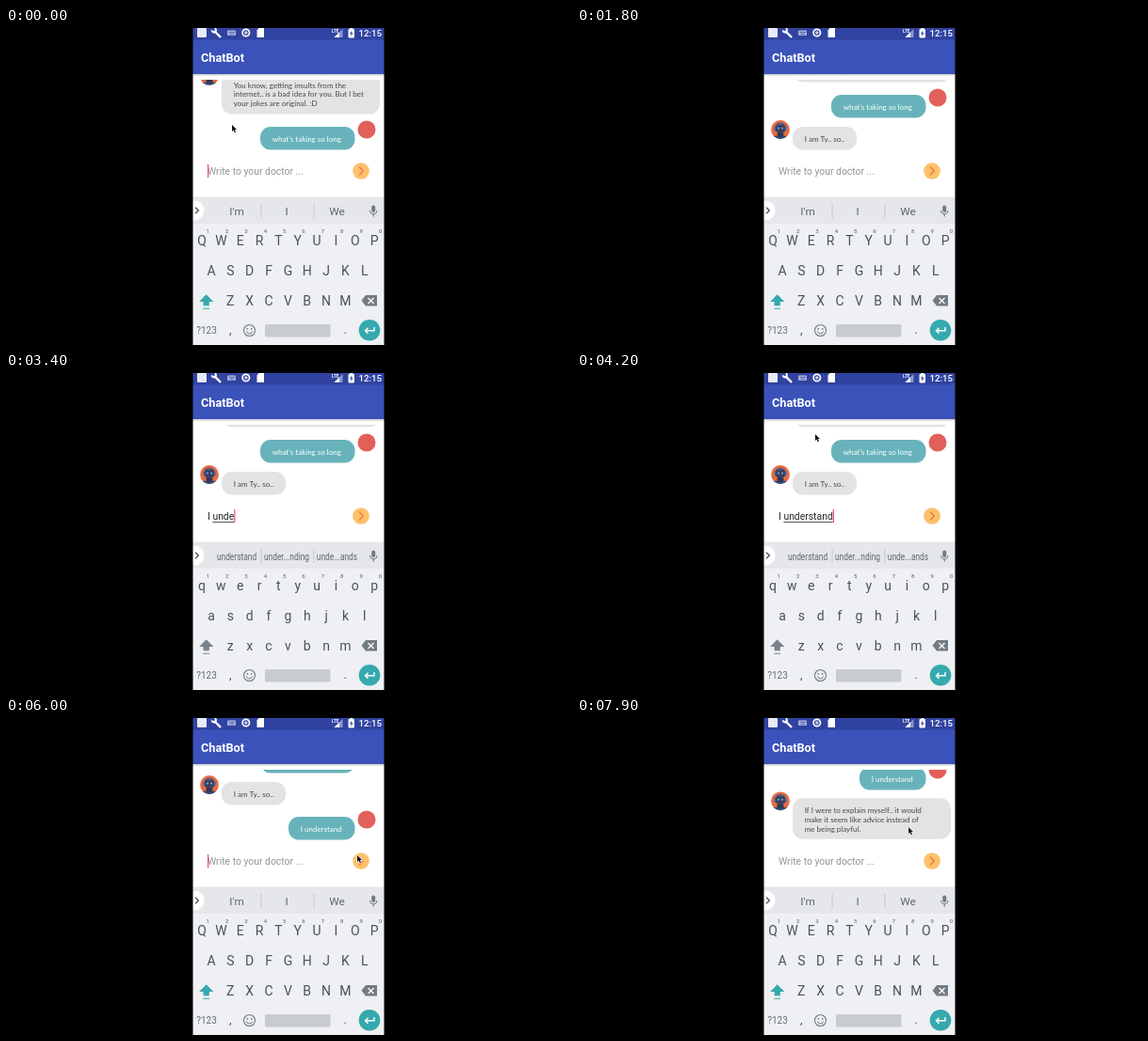
An HTML page with a canvas that plays this animation: 600 px wide and 337 px high, repeating every 8 s.

```html
<!DOCTYPE html>
<html lang="en">
<head>
<meta charset="utf-8">
<title>ChatBot</title>
<style>
html, body { margin: 0; width: 100%; height: 100%; overflow: hidden; background: #000; }
canvas { display: block; }
</style>
</head>
<body>
<canvas width="600" height="337"></canvas>
<script>
const c = document.querySelector('canvas').getContext('2d');
const LOOP = 8000, SEND = 4800, SHIFT_OFF = 2300, SHIFT_ON = 5400;
const UI = 'Roboto, sans-serif', CHAT = 'Lato, sans-serif';
const TEAL = '#35a9ae', GREY = '#737c83', KEY = '#4a535a';
const TYPED = 'I understand';

// Chat history in list coordinates; `me` marks the right-hand side.
const messages = [
  { y: 47.9, w: 168, lines: ['You know, getting insults from the', 'internet.. is a bad idea for you. But I bet', 'your jokes are original. :D'] },
  { y: 105, w: 100.5, me: true, lines: ["what's taking so long"] },
  { y: 139, w: 68, at: 900, lines: ['I am Ty.. so..'] },
  { y: 176, w: 70.5, at: SEND, me: true, lines: [TYPED] },
  { y: 209.3, w: 168, at: 7500, lines: ['If I were to explain myself.. it would', 'make it seem like advice instead of', 'me being playful.'] }
];
const scrolls = [[900, 34], [SEND, 37], [7500, 53]];
const pointerPath = [[0, 240, 103], [3950, 253, 65], [4250, 253, 65], [4700, 373, 146], [6700, 373, 146], [7100, 368, 140], [7900, 352, 116], [8000, 352, 116]];

const clamp = v => Math.max(0, Math.min(1, v));
const ease = v => 1 - (1 - clamp(v)) ** 3;

function rect(x, y, w, h, color, r = 0) {
  c.fillStyle = color;
  c.beginPath();
  c.roundRect(x, y, w, h, r);
  c.fill();
}
function circle(x, y, r, color, from = 0, to = 7) {
  c.fillStyle = color;
  c.beginPath();
  c.arc(x, y, r, from, to);
  c.fill();
}
function poly(points, color) {
  c.fillStyle = color;
  c.beginPath();
  points.forEach(p => c.lineTo(...p));
  c.closePath();
  c.fill();
}
function line(points, color, width = 1) {
  c.strokeStyle = color;
  c.lineWidth = width;
  c.beginPath();
  points.forEach(p => c.lineTo(...p));
  c.stroke();
}
function ring(x, y, r, color, width = 1, from = 0, to = 7) {
  c.strokeStyle = color;
  c.lineWidth = width;
  c.beginPath();
  c.arc(x, y, r, from, to);
  c.stroke();
}
function text(s, x, y, size, color, { family = UI, weight = 400, align = 'left' } = {}) {
  c.font = `${weight} ${size}px ${family}`;
  c.fillStyle = color;
  c.textAlign = align;
  c.fillText(s, x, y);
}
const centered = (s, x, y, size, color, weight) => text(s, x, y, size, color, { align: 'center', weight });

function header() {
  rect(198, 0, 204, 49, '#3a52b9');
  rect(198, 0, 204, 12.5, '#3143a0');
  text('ChatBot', 207, 35.5, 12.7, '#fff', { weight: 700 });
  rect(203, 0, 10, 10, '#e8eaf6', 1);
  line([[221, 3], [228, 10]], '#fff', 2.4);
  ring(220.8, 2.3, 2.2, '#fff', 1.8, -1.2, 3.1);
  rect(235, 2.5, 9, 5.5, '#aab3dd', 1);
  line([[236.5, 4.5], [243, 4.5]], '#3143a0', .7);
  line([[237.5, 6.6], [242, 6.6]], '#3143a0', .7);
  ring(254.8, 5, 3.7, '#fff', 1.7);
  circle(254.8, 5, 1.8, '#c5cae9');
  poly([[268.5, 0], [274, 0], [274, 10], [266.5, 10], [266.5, 2.5]], '#fff');
  text('LTE', 346, 4.5, 4.5, '#fff', { weight: 700 });
  poly([[357.5, 1], [357.5, 10], [348.5, 10]], '#8d98d0');
  poly([[354, 4.5], [354, 10], [348.5, 10]], '#fff');
  rect(363.5, 1, 6.5, 9.5, '#fff', 1);
  rect(365.3, 0, 3, 2, '#fff');
  poly([[367.3, 2.5], [365, 6.2], [366.6, 6.2], [366.2, 9], [368.6, 5.2], [367, 5.2]], '#3143a0');
  text('12:15', 374.5, 9, 9.7, '#fff', { weight: 500 });
  const shade = c.createLinearGradient(0, 49, 0, 52);
  shade.addColorStop(0, '#0003');
  shade.addColorStop(1, '#0000');
  rect(198, 49, 204, 3, shade);
}

function robot(y) {
  circle(216, y, 9.9, '#ea6a40');
  circle(216, y, 9.9, '#2f4c80', .75, Math.PI - .75);
  ring(216, y - 1, 5.8, '#3f5c92', 1.4, Math.PI, 0);
  rect(209.5, y - 3, 13, 5, '#3f66a0', 2);
  rect(211.3, y - 5.5, 9.4, 9, '#3a4160', 3);
  rect(212.5, y + 3, 7, 5, '#2f3758', 2);
  circle(214, y - 1.5, 1, '#8ea9cf');
  circle(218, y - 1.5, 1, '#8ea9cf');
}

function bubble(m, offset) {
  const h = m.lines.length > 1 ? 43.5 : 24.5;
  const y = m.y - offset, x = m.me ? 370.5 - m.w : 229;
  if (m.me) circle(383, y + 3, 9.5, '#e2605a');
  else robot(y + 3);
  rect(x, y, m.w, h, m.me ? '#68b3bb' : '#e3e2e4', 11);
  m.lines.forEach((s, i) =>
    text(s, x + 12.7, y + 15.6 + i * 9.9, 8, m.me ? '#fff' : '#484848', { family: CHAT }));
}

function list(t) {
  const offset = scrolls.reduce((sum, [at, d]) => sum + d * ease((t - at) / 200), 0);
  c.save();
  c.beginPath();
  c.rect(198, 55, 204, 82);
  c.clip();
  for (const m of messages) {
    if (m.at > t) continue;
    c.globalAlpha = m.at ? clamp((t - m.at) / 150) : 1;
    bubble(m, offset);
  }
  c.restore();
}

function typedAt(t) {
  if (t < 2800 || t >= SEND) return '';
  return TYPED.slice(0, t < 3000 ? 1 : 2 + Math.floor((t - 3000) / 95));
}

function inputRow(t, s) {
  const y = 156;
  let caret = 214.5;
  if (s) {
    text(s, 214, y, 10.4, '#262626');
    caret = 214.5 + c.measureText(s).width;
    const start = s.length > 2 ? 214 + c.measureText('I ').width : 214;
    line([[start, 158.5], [caret - .5, 158.5]], '#333', .8);
  } else {
    text('Write to your doctor ...', 214, y, 10.4, '#949494');
  }
  if (t % 1000 < 500) rect(caret - .5, 145, 1.2, 14, '#ee4a70');
  circle(377, 152, 8.8, '#fdc16b');
  line([[375, 147.5], [379.3, 152], [375, 156.5]], '#ec7a40', 1.3);
}

function suggestions(t, s) {
  rect(198, 179.5, 204, 28.5, '#e5e7ea');
  c.save();
  c.beginPath();
  c.rect(198, 180, 20, 28);
  c.clip();
  circle(200, 194, 10.5, '#fff');
  c.restore();
  line([[201, 190.7], [204.4, 194], [201, 197.3]], '#4a5359', 1.3);
  const long = s.length > 5 || (t >= SEND && t < SHIFT_ON);
  const words = long ? ['understand', 'under...nding', 'unde...ands'] : ["I'm", 'I', 'We'];
  words.forEach((w, i) => {
    c.save();
    c.translate([245, 298, 351.5][i], 198.5);
    if (long) c.scale(.71, 1);  // condensed style for long words
    centered(w, 0, 0, 11.8, '#5f686f');
    c.restore();
  });
  for (const x of [270.5, 326.5]) rect(x, 187, 1, 15, '#c3c8cc');
  rect(388.2, 188.5, 4, 7.5, GREY, 2);
  ring(390.2, 194, 3.8, GREY, 1, 0, Math.PI);
  line([[390.2, 198], [390.2, 200.5]], GREY, 1.2);
}

function keyboard(upper) {
  rect(198, 208, 204, 129, '#eef0f3');
  const rows = [['QWERTYUIOP', 208, 231], ['ASDFGHJKL', 218, 262.5], ['ZXCVBNM', 238.3, 294.5]];
  for (const [keys, x, y] of rows)
    [...keys].forEach((k, i) => centered(upper ? k : k.toLowerCase(), x + i * 20.35, y, 14, KEY));
  for (let i = 0; i < 10; i++) centered((i + 1) % 10, 214.3 + i * 20.35, 218.3, 6, GREY, 500);

  const shift = upper ? TEAL : '#78828a';
  poly([[212.7, 283.3], [220.3, 291], [215.8, 291], [215.8, 295.3], [209.6, 295.3], [209.6, 291], [205.1, 291]], shift);
  rect(209.3, 297.8, 6.8, 1, shift);
  poly([[382, 284], [394, 284], [394, 295.5], [382, 295.5], [377.5, 289.7]], GREY);
  line([[384.5, 287], [390.5, 293]], '#fff', 1.2);
  line([[390.5, 287], [384.5, 293]], '#fff', 1.2);

  centered('?123', 213, 325, 10, '#646d74');
  centered(',', 238.3, 325, 13, KEY);
  centered('.', 360.3, 325, 13, KEY);
  ring(258.5, 321.5, 6, GREY, 1.1);
  circle(256.3, 319.8, .9, GREY);
  circle(260.7, 319.8, .9, GREY);
  ring(258.5, 321.8, 3.2, GREY, 1, .2, Math.PI - .2);
  rect(275, 315, 69.5, 13.5, '#c8cbcf', 1.5);
  circle(386, 321.3, 11.3, TEAL);
  line([[391, 318], [391, 321.7], [381.5, 321.7]], '#fff', 1.4);
  line([[384.5, 318.7], [381.5, 321.7], [384.5, 324.7]], '#fff', 1.4);
}

function pointer(t) {
  if (t > 1000 && t < 3950) return;  // hidden while typing
  const i = t <= 1000 ? 0 : pointerPath.findIndex(p => p[0] > t) - 1;
  const [t0, x0, y0] = pointerPath[i], [t1, x1, y1] = pointerPath[i + 1];
  const k = i ? (t - t0) / (t1 - t0) : 0;
  c.save();
  c.translate(x0 + (x1 - x0) * k, y0 + (y1 - y0) * k);
  const arrow = [[0, 0], [0, 7], [1.6, 5.6], [2.8, 8.2], [4, 7.7], [2.9, 5.1], [5, 5], [0, 0]];
  line(arrow, '#fff', 1.2);
  poly(arrow, '#111');
  c.restore();
}

function draw(now) {
  const t = now % LOOP, s = typedAt(t);
  rect(198, 0, 204, 337, '#fff');
  header();
  list(t);
  inputRow(t, s);
  suggestions(t, s);
  keyboard(t < SHIFT_OFF || t >= SHIFT_ON);
  pointer(t);
  rect(0, 0, 198.5, 337, '#000');
  rect(401.5, 0, 198.5, 337, '#000');
}

const start = performance.now();
function tick() {
  draw(performance.now() - start);
  requestAnimationFrame(tick);
}
tick();
</script>
</body>
</html>
```
